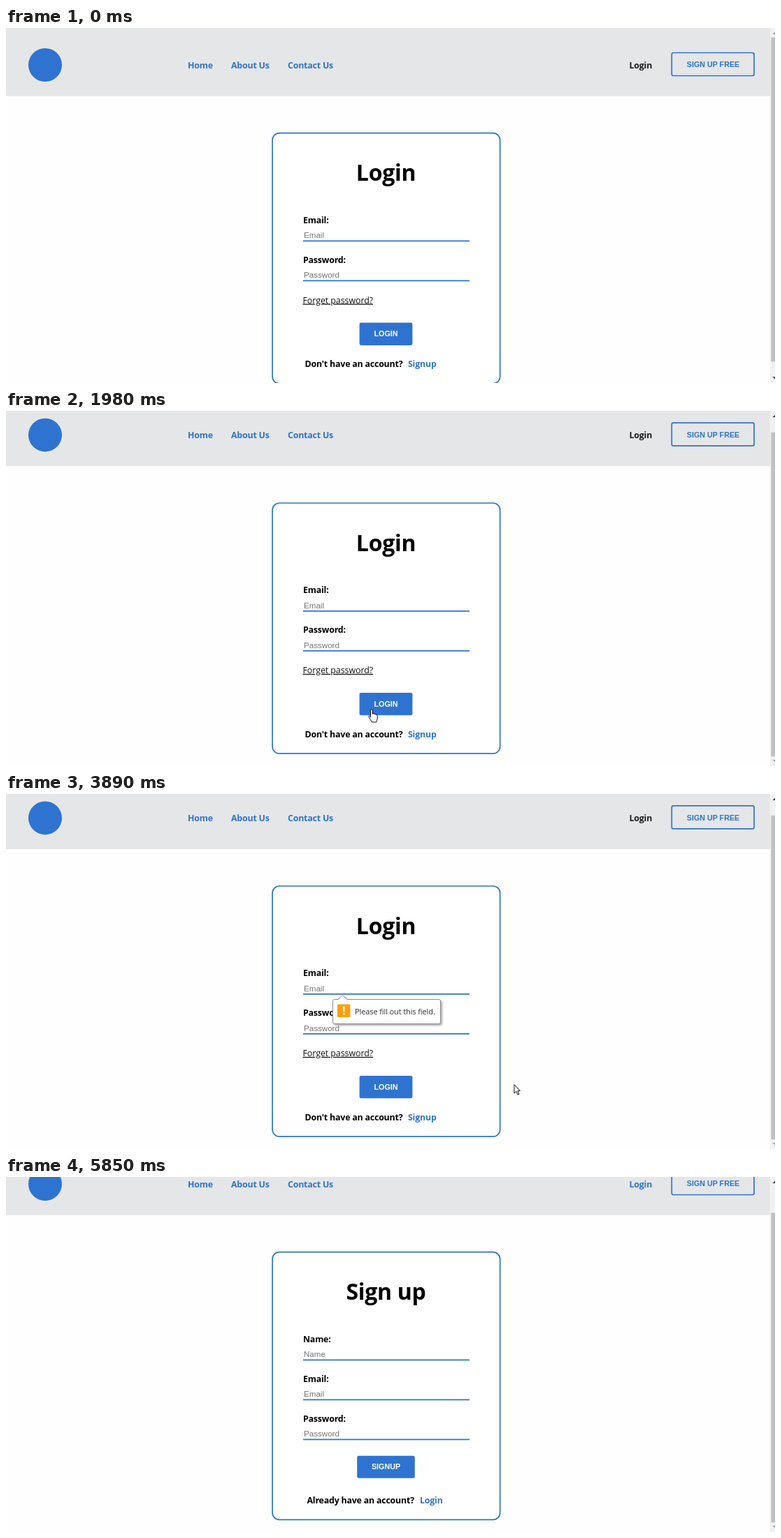
Recreate the animation shown at these times as an HTML page. Size 1100x509 px, loop 6.71 s.

```html
<!DOCTYPE html>
<html lang="en">
<head>
<meta charset="utf-8">
<title>Login and sign up</title>
<style>
  html, body { margin: 0; width: 100%; height: 100%; overflow: hidden; background: #fefefe; }
  svg { display: block; width: 100%; height: 100%; }
  text { font-family: "Open Sans", "Noto Sans", sans-serif; white-space: pre; }
  .bold { font-size: 12.4px; font-weight: 700; letter-spacing: -.2px; }
  .plain { font-size: 12.4px; letter-spacing: -.05px; fill: #111; }
  .title { font-size: 32px; font-weight: 700; letter-spacing: -.3px; text-anchor: middle; }
  .hint, .button { font-family: "Liberation Sans", Arial, sans-serif; }
  .hint { font-size: 11.6px; fill: #757575; }
  .button { font-size: 10.73px; font-weight: 700; text-anchor: middle; }
  .status { font-size: 9.66px; letter-spacing: -.2px; fill: #50545a; }
  .tip { font-size: 11px; letter-spacing: -.11px; fill: #333; }
  .blue { fill: #2f73d0; }
  .line { fill: none; stroke: #2f73d0; stroke-width: 1.7; }
  .white { fill: #fff; }
</style>
</head>
<body>
<svg id="stage" viewBox="0 0 1100 509" preserveAspectRatio="none"></svg>
<script>
const LOOP = 6710, TICK = 66.5;
const VIEW = 509, TRACK_TOP = 13.7, TRACK = 481.6;
const LOGIN_SCROLL = 18.6, SIGNUP_SCROLL = 43;
const SUBMIT = 2320, BLUR = 4430, SWITCH = 4640;

const text = (x, y, cls, str) => `<text x="${x}" y="${y}" class="${cls}">${str}</text>`;

const field = (y, name) =>
  text(425, y, "bold", name + ":") +
  text(426, y + 21.3, "hint", name) +
  `<path class="line" d="M425 ${y + 25.4}h238"/>`;

const card = (height, title) =>
  `<rect class="line" x="381.1" y="150.6" width="325.6" height="${height}" rx="10" style="fill:#fff"/>` +
  text(543.5, 219.2, "title", title);

const button = (x, y, w, h, label) =>
  `<rect class="blue" x="${x}" y="${y}" width="${w}" height="${h}" rx="2.4"/>` +
  text(x + w / 2, y + h / 2 + 3.6, "button white", label);

const header = `
  <rect width="1093" height="97.6" fill="#e5e6e8"/>
  <circle cx="56" cy="53" r="24" class="blue"/>
  ${text(260, 58, "bold blue", "Home")}
  ${text(322, 58, "bold blue", "About Us")}
  ${text(403, 58, "bold blue", "Contact Us")}
  <g id="navLogin">${text(891.5, 58, "bold", "Login")}</g>
  <rect class="line" x="952.3" y="35.5" width="117.8" height="33" rx="2.4"/>
  ${text(1011.5, 56.2, "button blue", "SIGN UP FREE")}`;

const login = card(359.2, "Login") + field(280, "Email") + field(337, "Password") +
  text(424.5, 394.5, "plain", "Forget password?").replace("<text", '<text text-decoration="underline"') +
  button(505.6, 422.5, 75.8, 32.4, "LOGIN") +
  text(427.5, 486.3, "bold", "Don't have an account?") +
  text(575, 486.3, "bold blue", "Signup") +
  `<path id="caret" d="M427.5 291v12.5" stroke="#000" stroke-width=".9"/>`;

const signup = card(383.8, "Sign up") + field(280, "Name") + field(337, "Email") + field(394, "Password") +
  button(502.2, 442.8, 82.6, 32, "SIGNUP") +
  text(430.5, 510.5, "bold", "Already have an account?") +
  text(592, 510.5, "bold blue", "Login");

const bubble = "M470 294.5h5l6.5-6 6.5 6h131q2.5 0 2.5 2.5v30q0 2.5-2.5 2.5h-149q-2.5 0-2.5-2.5v-30q0-2.5 2.5-2.5z";

const tooltip = `
  <path d="${bubble}" fill="#fff" stroke="#8c8c8c" style="filter:drop-shadow(2px 2px 1.5px #0005)"/>
  <rect x="474" y="301.6" width="18.4" height="18.4" rx="1" fill="#ff9f0a"/>
  <path d="M481.8 304.8h2.9l-.5 7.6h-1.9zM481.9 314h2.7v2.5h-2.7z" fill="#fff"/>
  ${text(499, 316.2, "tip", "Please fill out this field.")}`;

const scrollbar = `
  <rect x="1093" width="7" height="509" fill="#f1f1f1"/>
  <rect id="thumb" x="1094.4" width="5.6" fill="#c1c1c1"/>
  <path id="up" d="M1096.4 9l3.6-3.6V9z"/>
  <path id="down" d="M1096.4 500l3.6 3.6V500z"/>`;

const status = `
  <path d="M0 491.5h95.5q3.5 0 3.5 3.5v14H0z" fill="#dee1e6"/>
  ${text(-1.2, 504, "status", "localhost:3000/signup")}`;

const pointer = `
  <circle id="press" r="10" fill="#fff04a" fill-opacity=".75"/>
  <g fill="#fff" stroke="#000" stroke-width=".95" stroke-linejoin="round">
    <path id="arrow" d="M.5.5V13L3.4 10.3 5.5 15.1 7.5 14.2 5.4 9.6H9z"/>
    <path id="hand" d="M-1.5 11.5V1.2C-1.5-.6 1.2-.6 1.2 1.2V6.5C1.6 5.3 3.6 5.4 3.8 6.9 4.3 6 6 6.2 6.2 7.6 6.8 6.9 8.2 7.2 8.2 8.8V13C8.2 14.5 7 15.5 7 18H.2C.2 16-3.8 12.5-4 10.2-4 8.8-2.6 8.6-1.5 10.4"/>
  </g>`;

const group = (id, body) => `<g id="${id}">${body}</g>`;
document.getElementById("stage").innerHTML =
  group("page", header + group("login", login) + group("signup", signup)) +
  group("tooltip", tooltip) + scrollbar + group("status", status) + group("pointer", pointer);

const $ = id => document.getElementById(id);
const show = (id, on) => $(id).style.display = on ? "" : "none";
const clamp = v => Math.max(0, Math.min(1, v));
const ease = v => v * v * (3 - 2 * v);
const during = (t, a, b) => t >= a && t < b;

// time, x, y of the pointer's hot spot
const path = [
  [190, 1037, 497], [450, 930, 420], [850, 826, 338], [920, 821, 335.5], [1130, 821, 335.5],
  [1570, 702, 327], [1900, 523, 428], [2040, 523, 428], [2160, 523.5, 433], [2700, 523.5, 433],
  [2920, 524, 427], [3000, 540, 426], [3180, 769, 402], [3250, 769, 402], [3460, 787, 394],
  [3650, 787, 394], [4250, 611.5, 458], [4770, 611.5, 458], [5090, 689, 375.5],
  [5570, 689, 375.5], [5780, 926, 481], [5850, 926, 481]
];

function pointerAt(t) {
  const i = path.findIndex(p => p[0] > t);
  if (i < 1) return path[i ? path.length - 1 : 0].slice(1);
  const [t0, x0, y0] = path[i - 1], [t1, x1, y1] = path[i];
  const k = (t - t0) / (t1 - t0);
  return [x0 + (x1 - x0) * k, y0 + (y1 - y0) * k];
}

function scrollAt(t) {
  return t >= 5370 ? SIGNUP_SCROLL : LOGIN_SCROLL * ease(clamp((t - 1190) / 200));
}

function render(t) {
  const onSignup = t >= SWITCH, scroll = scrollAt(t);
  const max = onSignup ? SIGNUP_SCROLL : LOGIN_SCROLL;
  const ratio = TRACK / (VIEW + max);

  $("page").setAttribute("transform", `translate(0 ${-scroll})`);
  show("login", !onSignup);
  show("signup", onSignup);
  $("navLogin").setAttribute("fill", onSignup ? "#2f73d0" : "#1c1c1c");

  $("thumb").setAttribute("y", TRACK_TOP + scroll * ratio);
  $("thumb").setAttribute("height", VIEW * ratio);
  $("up").setAttribute("fill", scroll > 0 ? "#404040" : "#a3a3a3");
  $("down").setAttribute("fill", scroll < max - .5 ? "#404040" : "#a3a3a3");

  const focused = during(t, SUBMIT, BLUR);
  show("caret", focused && Math.floor((t - SUBMIT) / 495) % 2 === 0);
  $("tooltip").style.opacity = clamp((t - SUBMIT + 50) / 150) * clamp((BLUR + 100 - t) / 100);
  show("tooltip", during(t, SUBMIT, BLUR + 100));
  show("status", during(t, BLUR, 4970));

  // the pointer moves in even ticks, as in a screen recording
  const [x, y] = pointerAt(Math.floor((t + 10) / TICK) * TICK);
  const overLink = during(t, 4170, SWITCH);
  const overLogin = during(t, 1650, 3100) && x > 505 && x < 582 && y > 403 && y < 437;
  const hand = overLink || overLogin;
  show("pointer", during(t, 190, 5850));
  $("pointer").setAttribute("transform", `translate(${x} ${y})`);
  show("hand", hand);
  show("arrow", !hand);
  show("press", during(t, 2170, 2450) || during(t, BLUR, SWITCH));
}

const start = performance.now();
(function frame() {
  render((performance.now() - start) % LOOP);
  requestAnimationFrame(frame);
})();
</script>
</body>
</html>
```
